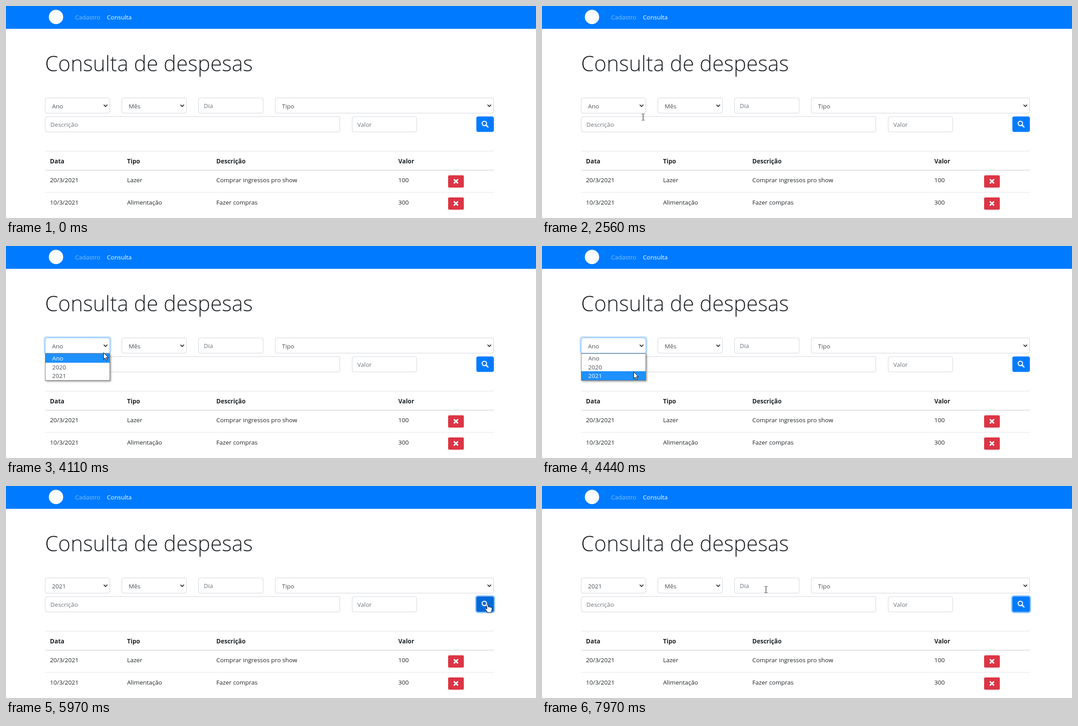
An HTML page for the animation above (8 s loop, 1182 by 474 pixels).

```html
<!DOCTYPE html>
<html lang="pt-BR">
<head>
<meta charset="utf-8">
<title>Consulta de despesas</title>
<style>
  html, body { margin: 0; width: 100%; height: 100%; overflow: hidden; background: #fff; }
  body { position: relative; }
  svg { position: absolute; left: 0; top: 0; display: block; }
  svg, #popup { font: 13.5px 'Open Sans', 'Noto Sans', sans-serif; }
  .field { fill: #fff; stroke: #ced4da; }
  .value { fill: #495057; }
  .hint { fill: #6c757d; }
  .cell { fill: #212529; }
  .head { fill: #212529; font-weight: 700; }
  .chevron { fill: none; stroke: #343a40; stroke-width: 2; }
  .ring { fill: none; stroke-width: 3; }
  #popup {
    position: absolute; left: 87px; top: 240px; width: 145px; height: 61px;
    box-sizing: border-box; border: 1px solid transparent; color: #495057;
    box-shadow: 2px 2px 4px rgba(0, 0, 0, .4);
  }
  #popup.filled { background: #fff; border-color: #767676; }
  #popup div { height: 19.67px; line-height: 20px; padding-left: 15px; visibility: hidden; }
  #popup.filled div { visibility: visible; }
  #popup .on { background: #1e90ff; color: #fff; }
</style>
</head>
<body>
<svg id="page" width="1182" height="474" viewBox="0 0 1182 474"></svg>
<div id="popup"><div>Ano</div><div>2020</div><div>2021</div></div>
<svg width="1182" height="474" viewBox="0 0 1182 474">
  <g id="arrow"><path d="M.5 .5V15.6L4 12.3L6.4 17.5L8.6 16.5L6.3 11.4H11Z" fill="#fff" stroke="#000"/></g>
  <g id="beam"><path d="M-3 -7H-1L0 -6L1 -7H3M0 -6V6M-3 7H-1L0 6L1 7H3" fill="none" stroke="#000"/></g>
  <g id="hand"><path d="M-1.5 1.5Q0 -1 1.5 1.5V6.5Q3 5 4.5 7Q6 5.8 7.3 7.7Q9 6.8 10 9V13L8 17V19H-1V17L-5.5 11Q-5.5 8.5 -3.5 9.5L-1.5 11.5Z" fill="#fff" stroke="#000"/></g>
</svg>
<script>
const LOOP = 8000;
const OPEN = 3480, LIST = 3640, CHOOSE = 4810, SEARCH = 5890;
const $ = id => document.getElementById(id);

// Static page
const text = (x, y, cls, s, more = '') => `<text x="${x}" y="${y}" class="${cls}" ${more}>${s}</text>`;
const rect = (x, y, w, h, more) => `<rect x="${x}" y="${y}" width="${w}" height="${h}" ${more}/>`;
const field = (x, y, w) => rect(x + .5, y + .5, w - 1, 34, 'rx="3.5" class="field"');
const input = (x, y, w, hint) => field(x, y, w) + text(x + 12, y + 23, 'hint', hint);
const select = (x, w, label, id) => field(x, 205, w) + text(x + 15.5, 229, 'value', label, `id="${id}"`) +
  `<path class="chevron" d="M${x + w - 14} 220.8l4 4l4 -4"/>`;
const line = (y, h) => rect(87, y, 1001, h, 'fill="#dee2e6"');
const columns = [98, 270, 469, 875];
const row = (y, cls, cells) => cells.map((s, i) => text(columns[i], y, cls, s)).join('');
const remove = y => rect(986, y - 13.5, 35, 27.5, 'rx="3" fill="#dc3545"') +
  `<path d="M999.8 ${y - 3.7}l7.4 7.4m0 -7.4l-7.4 7.4" stroke="#fff" stroke-width="3.2" stroke-linecap="round"/>`;

$('page').innerHTML = [
  rect(0, 0, 1182, 51, 'fill="#007bff"'),
  '<circle cx="111.5" cy="24.5" r="16" fill="#fff"/>',
  text(154, 30, '', 'Cadastro', 'fill="#fff" fill-opacity=".5"'),
  text(225, 30, '', 'Consulta', 'fill="#fff"'),
  text(87, 146, 'cell', 'Consulta de despesas', 'font-size="47.2" font-weight="300"'),
  select(87, 145, 'Ano', 'year'),
  select(258, 145, 'Mês', 'month'),
  input(429, 205, 145, 'Dia'),
  select(600, 488, 'Tipo', 'type'),
  input(87, 247, 658, 'Descrição'),
  input(771.5, 247, 145, 'Valor'),
  '<g id="yearFocus">' + rect(87.5, 205.5, 144, 34, 'rx="3.5" fill="none" stroke="#80bdff"') +
    rect(85.5, 203.5, 148, 38, 'rx="5" class="ring" stroke="#007bff" stroke-opacity=".25"') + '</g>',
  rect(1049, 247, 39, 34.5, 'rx="4" id="search"'),
  '<g fill="none" stroke="#fff"><circle cx="1066.8" cy="262.6" r="4.9" stroke-width="2.3"/>' +
    '<path d="M1070.7 266.5l4 4" stroke-width="2.8" stroke-linecap="round"/></g>',
  '<g id="searchFocus">' +
    rect(1047.7, 245.7, 41.6, 37, 'rx="5" class="ring" stroke="#268fff" stroke-opacity=".5"') + '</g>',
  line(324, 1), line(366, 2), line(416, 1),
  row(352, 'head', ['Data', 'Tipo', 'Descrição', 'Valor']),
  row(394, 'cell', ['20/3/2021', 'Lazer', 'Comprar ingressos pro show', '100']),
  row(444, 'cell', ['10/3/2021', 'Alimentação', 'Fazer compras', '300']),
  remove(392), remove(441.5)
].join('');

// Pointer moves: first step, last step, step count, end point, optional bend
const start = [1236, 430];
const moves = [
  [770, 1000, 4, [749, 276]],
  [1240, 2010, 11, [315.5, 261.5], [530, 331]],
  [2090, 2320, 4, [225.5, 248.5]],
  [2640, 2640, 1, [226, 246]],
  [2790, 2790, 1, [227, 246]],
  [2960, 3190, 4, [221, 227]],
  [4030, 4510, 7, [203, 284]],
  [4810, 5280, 7, [1094, 281], [650, 367]],
  [5430, 5810, 6, [1074, 264]],
  [6290, 6750, 7, [459, 309], [770, 396]],
  [6820, 7050, 4, [375, 218]],
  [7510, 7970, 7, [499.5, 231.5], [415, 234]]
];

function pointerAt(t) {
  let from = start;
  for (const [t0, t1, steps, to, bend] of moves) {
    if (t < t0) break;
    if (t < t1) {
      const u = (Math.floor((t - t0) / (t1 - t0) * (steps - 1)) + 1) / steps;
      const e = u * u * (3 - 2 * u), r = 1 - e;
      return from.map((a, i) => {
        const mid = bend ? bend[i] : (a + to[i]) / 2;
        return r * r * a + 2 * r * e * mid + e * e * to[i];
      });
    }
    from = to;
  }
  return from;
}

const inside = ([x, y], l, t, r, b) => x >= l && x <= r && y >= t && y <= b;
const clamp = (v, lo, hi) => Math.min(hi, Math.max(lo, v));
const show = (el, on) => { el.style.display = on ? '' : 'none'; };
const snap = v => Math.round(v * 2) / 2;

function pointerKind(p, open) {
  if (open) return 'arrow';
  if (inside(p, 1049, 247, 1088, 281)) return 'hand';
  const typing = inside(p, 87, 247, 745, 281) || inside(p, 771, 247, 916, 281) || inside(p, 429, 205, 574, 240);
  return typing ? 'beam' : 'arrow';
}

function draw(t) {
  const p = pointerAt(t);
  const open = t >= OPEN && t < CHOOSE;
  const kind = pointerKind(p, open);
  for (const id of ['arrow', 'beam', 'hand']) {
    const [x, y] = id === 'beam' ? p.map(v => Math.floor(v) + .5) : p.map(Math.round);
    show($(id), id === kind);
    $(id).setAttribute('transform', `translate(${snap(x)} ${snap(y)})`);
  }

  const popup = $('popup');
  show(popup, open);
  popup.style.opacity = t < OPEN + 90 ? .4 : 1;
  popup.classList.toggle('filled', t >= LIST);
  const active = clamp(Math.floor((p[1] - 240.5) / 19.6), 0, 2);
  [...popup.children].forEach((el, i) => el.classList.toggle('on', i === active));

  $('year').textContent = t < CHOOSE ? 'Ano' : '2021';
  const fadeIn = t < LIST ? 0 : t < LIST + 70 ? .5 : 1;
  const fadeOut = t < SEARCH ? 0 : t < SEARCH + 75 ? .5 : 1;
  $('yearFocus').style.opacity = fadeIn - fadeOut;
  $('searchFocus').style.opacity = fadeOut;
  $('search').setAttribute('fill', kind === 'hand' ? '#0069d9' : '#007bff');
}

const begin = performance.now();
function tick() {
  draw((performance.now() - begin) % LOOP);
  requestAnimationFrame(tick);
}
tick();
</script>
</body>
</html>
```
